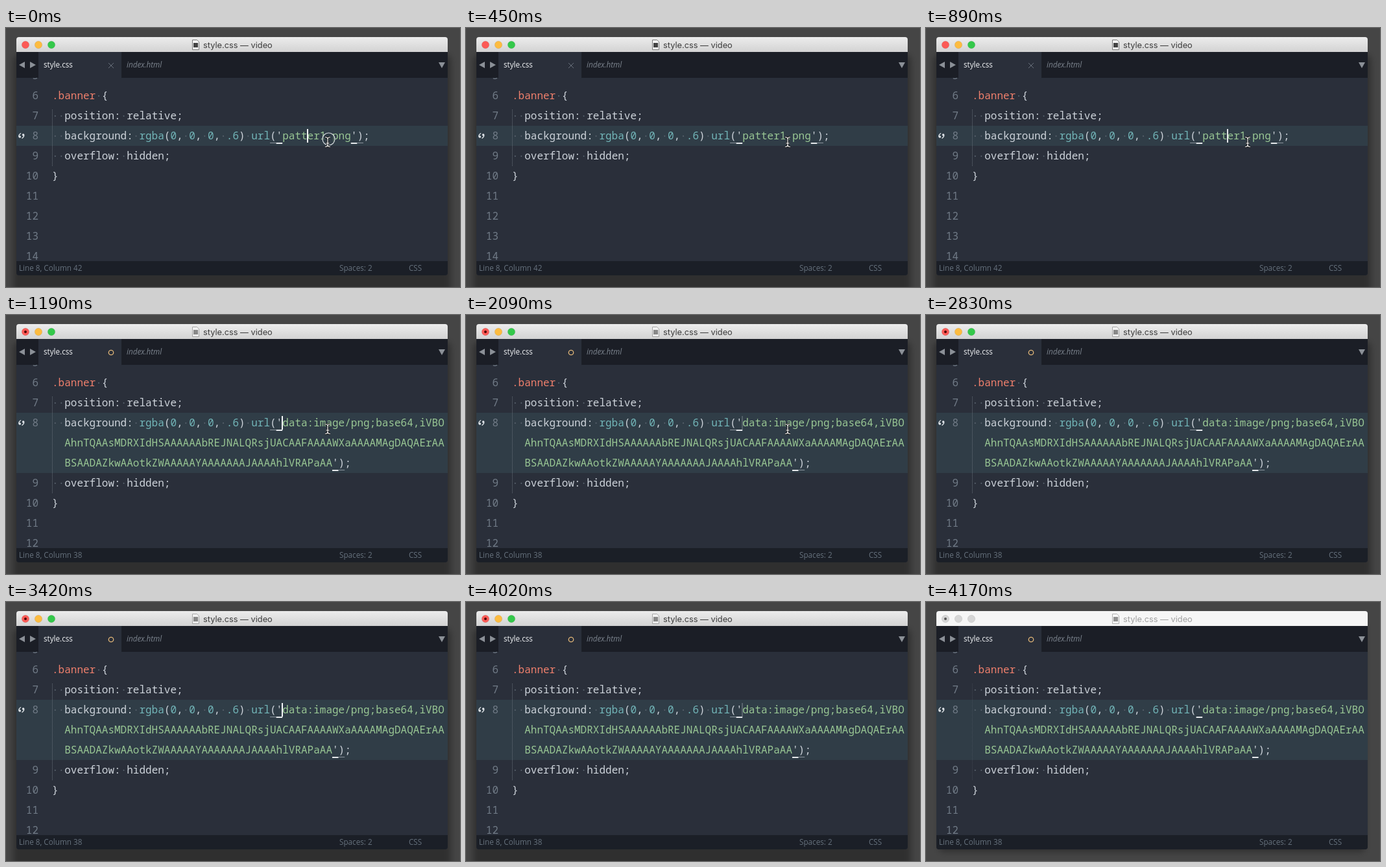
Write an HTML page that moves like this. It is 700x400 px and loops after 4.27 s.

```html
<!DOCTYPE html>
<html lang="en">
<head>
<meta charset="utf-8">
<title>Editor</title>
<style>
  html, body { margin: 0; width: 100%; height: 100%; overflow: hidden; background: #454545; }
  svg { display: block; width: 700px; height: 400px; }
  text { white-space: pre; }
  .code { font: 16px "Noto Sans Mono", monospace; fill: #cdd3da; }
  .ui { font: 11.7px "Open Sans", sans-serif; fill: #66717d; }
  .title { font: 12.8px Inter, sans-serif; fill: #3c3c3c; }
  .sel { fill: #ee7f6c; }
  .fn { fill: #72b5b8; }
  .str { fill: #99c794; }
  .num { fill: #717b87; text-anchor: end; }
  .space { fill: #56606b; }
  .shadow { filter: blur(5px); }
</style>
</head>
<body>
<svg viewBox="0 0 700 400">
  <defs>
    <linearGradient id="bar" x2="0" y2="1">
      <stop stop-color="#ececec"/><stop offset="1" stop-color="#d3d3d3"/>
    </linearGradient>
    <clipPath id="frame"><rect x="16" y="14" width="665" height="368" rx="4"/></clipPath>
    <clipPath id="pane"><rect x="16" y="77" width="665" height="283"/></clipPath>
  </defs>

  <rect id="deepShadow" class="shadow" x="11" y="40" width="675" height="390" rx="12" opacity=".3"/>
  <rect id="flatShadow" class="shadow" x="20" y="30" width="657" height="356" rx="8" opacity=".3"/>

  <g clip-path="url(#frame)">
    <rect x="16" y="14" width="665" height="368" fill="#2a2f3a"/>
    <rect id="titleBar" x="16" y="14" width="665" height="23"/>
    <g id="lights"></g>
    <circle id="dirtyDot" cx="30" cy="26" r="2"/>
    <g id="docIcon">
      <path d="M287.5 18.5h7l3 3v12h-10z" fill="#fafafa" stroke="#777"/>
      <rect x="289" y="23" width="7" height="7" fill="#444"/>
    </g>
    <text id="title" class="title" x="304" y="31">style.css — video</text>

    <path d="M16 37H50V77H16zM178 37H681V77H178z" fill="#1b1e26"/>
    <path d="M29 52v10l-9-5zM37 52v10l9-5zM667 53h10l-5 9z" fill="#8b9097"/>
    <text class="ui" x="58" y="61" style="fill:#f2f4f6">style.css</text>
    <text class="ui" x="186" y="61" style="fill:#7c848e;font-style:italic">index.html</text>
    <path id="closeMark" d="M158 54l8 8m0-8l-8 8" stroke="#69717c"/>
    <circle id="dirtyRing" cx="162" cy="58" r="3.7" fill="none" stroke="#e3b778" stroke-width="1.3"/>

    <g class="code" clip-path="url(#pane)">
      <g id="before"></g>
      <g id="after"></g>
    </g>
    <g fill="none" stroke="#dfe4e8" stroke-width="1.5">
      <path d="M20.5 168.5q-2-3 2.5-6M27 164.5q2 3-2.5 6"/>
      <path d="M21.3 168h.1M26.6 165h.1" stroke-width="3.4" stroke-linecap="round"/>
    </g>
    <rect id="caret" y="156" width="2" height="21" fill="#f4f6f8"/>

    <rect x="16" y="360" width="665" height="22" fill="#1b1f27"/>
    <text id="position" class="ui" x="20" y="375"></text>
    <text class="ui" x="514" y="375">Spaces: 2</text>
    <text class="ui" x="621" y="375">CSS</text>
  </g>

  <circle id="click" cx="497.5" cy="171.5" r="9.5" fill="#2f3c46" fill-opacity=".65" stroke="#d5dade" stroke-width="1.2"/>
  <g id="mouse" fill="none"></g>
</svg>

<script>
const LOOP = 4270, PASTE = 1190, BLUR = 4170;
const LEFT = 71, CHAR = 9.6, ROW = 31;
const el = id => document.getElementById(id);
const colX = col => LEFT + col * CHAR;
const baseline = row => 110 + row * ROW;
const show = (id, on) => el(id).setAttribute('visibility', on ? 'visible' : 'hidden');

// Draws tokens on the character grid; spaces become faint dots.
function code(row, col, ...tokens) {
  return tokens.map(([text, kind = '']) => {
    const x = colX(col);
    col += text.length;
    const dotted = text.replace(/ /g, '<tspan class="space">·</tspan>');
    return `<text class="${kind}" x="${x}" y="${baseline(row)}">${dotted}</text>`;
  }).join('');
}

const lineNumber = (row, n) => `<text class="num" x="50" y="${baseline(row)}">${n}</text>`;

function underline(col, row, quote) {
  return `<rect class="${quote ? '' : 'paren'}" x="${colX(col)}" y="${177 + (row - 2) * ROW}" width="${CHAR}"
    height="${quote ? 2 : 1}" fill="${quote ? '#e6e9ec' : '#8b949d'}"/>`;
}

// chunks: the url string, one entry per wrapped row
function buffer(chunks) {
  const extra = chunks.length - 1, endRow = 2 + extra;
  const endCol = (extra ? 2 : 37) + chunks[extra].length;
  let out = `<rect x="16" y="151" width="665" height="${ROW * chunks.length}" fill="#303d47"/>
    <path class="guide" d="M71.5 126V${213 + extra * ROW}" stroke="#646c76" stroke-dasharray="1 1"/>`;
  for (let n = 5; n <= 14; n++) out += lineNumber(n - 6 + (n > 8 ? extra : 0), n);
  out += code(0, 0, ['.banner', 'sel'], [' {']);
  out += code(1, 0, ['  position: relative;']);
  out += code(2, 0, ['  background: '], ['rgba', 'fn'], ['('], ['0', 'fn'], [', '], ['0', 'fn'], [', '],
    ['0', 'fn'], [', '], ['.6', 'fn'], [') '], ['url', 'fn'], ["('"]);
  chunks.forEach((chunk, i) => out += code(2 + i, i ? 2 : 37, [chunk, 'str']));
  out += code(endRow, endCol, ["');"]);
  out += underline(35, 2) + underline(36, 2, true) + underline(endCol, endRow, true) + underline(endCol + 1, endRow);
  out += code(3 + extra, 0, ['  overflow: hidden;']);
  return out + code(4 + extra, 0, ['}']);
}

// Seeded filler letters: many capital A's, the rest mixed case.
let seed = 7;
function random() {
  seed = seed * 16807 % 2147483647;
  return seed / 2147483647;
}
function filler(length) {
  let run = false;
  return Array.from({ length }, () => {
    run = random() < (run ? 0.7 : 0.25);
    if (run) return 'A';
    const letter = String.fromCharCode(65 + Math.floor(random() * 26));
    return random() < 0.4 ? letter.toLowerCase() : letter;
  }).join('');
}

const mime = 'image/png';
el('before').innerHTML = buffer(['patter1.png']);
el('after').innerHTML = buffer([`data:${mime};base64,iVBO`, filler(61), filler(43)]);

const lightColors = ['#fc5b57', '#fdbc40', '#34c84a'];
el('lights').innerHTML = lightColors.map((color, i) =>
  `<circle cx="${30 + i * 20}" cy="26" r="5.7" stroke="#0002" stroke-width=".6"/>`).join('');

const beam = 'M-4-7.5q4 0 4 3V4.5q0 3-4 3M4-7.5q-4 0-4 3M0 4.5q0 3 4 3M-2.5 2h5';
el('mouse').innerHTML = `<path d="${beam}" stroke="#111" stroke-width="3"/>
  <path d="${beam}" stroke="#fff" stroke-width="1.2"/>`;

// The picture advances in steps of about 150 ms.
const stepStart = k => k * 150 - 10 * ((k >= 5) + (k >= 19) + (k >= 22));
function stepTime(t) {
  let k = 28;
  while (stepStart(k) > t) k--;
  return stepStart(k);
}

function caretAlpha(t) {
  if (t >= BLUR) return 0;
  if (t < 300 || (t >= PASTE && t < 1640)) return 1;
  const dark = t < PASTE ? 520 : 1945;
  const level = 0.5 - 0.55 * Math.cos((t - dark) / 960 * 2 * Math.PI);
  return Math.min(1, Math.max(0, level));
}

function draw(t) {
  const pasted = t >= PASTE, inactive = t >= BLUR;
  show('before', !pasted);
  show('after', pasted);
  show('closeMark', !pasted);
  show('dirtyRing', pasted);
  show('dirtyDot', pasted);
  show('click', t < 150);
  show('deepShadow', !inactive);
  show('flatShadow', inactive);

  el('caret').setAttribute('x', pasted ? 425 : 464);
  el('caret').setAttribute('opacity', caretAlpha(t));
  el('position').textContent = `Line 8, Column ${pasted ? 38 : 42}`;

  const [x, y] = t < 2540 ? [496, 176] : t < 2690 ? [512, 219] : [546, 297];
  el('mouse').setAttribute('transform', `translate(${x} ${y})`);
  show('mouse', t < 2830);

  el('titleBar').setAttribute('fill', inactive ? '#f6f6f6' : 'url(#bar)');
  el('title').style.fill = inactive ? '#a0a0a0' : '';
  el('docIcon').setAttribute('opacity', pasted ? 0.55 : 1);
  el('dirtyDot').setAttribute('fill', inactive ? '#555' : '#4d0000');
  [...el('lights').children].forEach((c, i) => c.setAttribute('fill', inactive ? '#d6d6d6' : lightColors[i]));
  document.querySelectorAll('#after .paren').forEach(p => p.setAttribute('opacity', inactive ? 0 : 1));
  document.querySelector('#after .guide').setAttribute('opacity', inactive ? 0.35 : 1);
}

function tick() {
  draw(stepTime(performance.now() % LOOP));
  requestAnimationFrame(tick);
}
tick();
</script>
</body>
</html>
```
